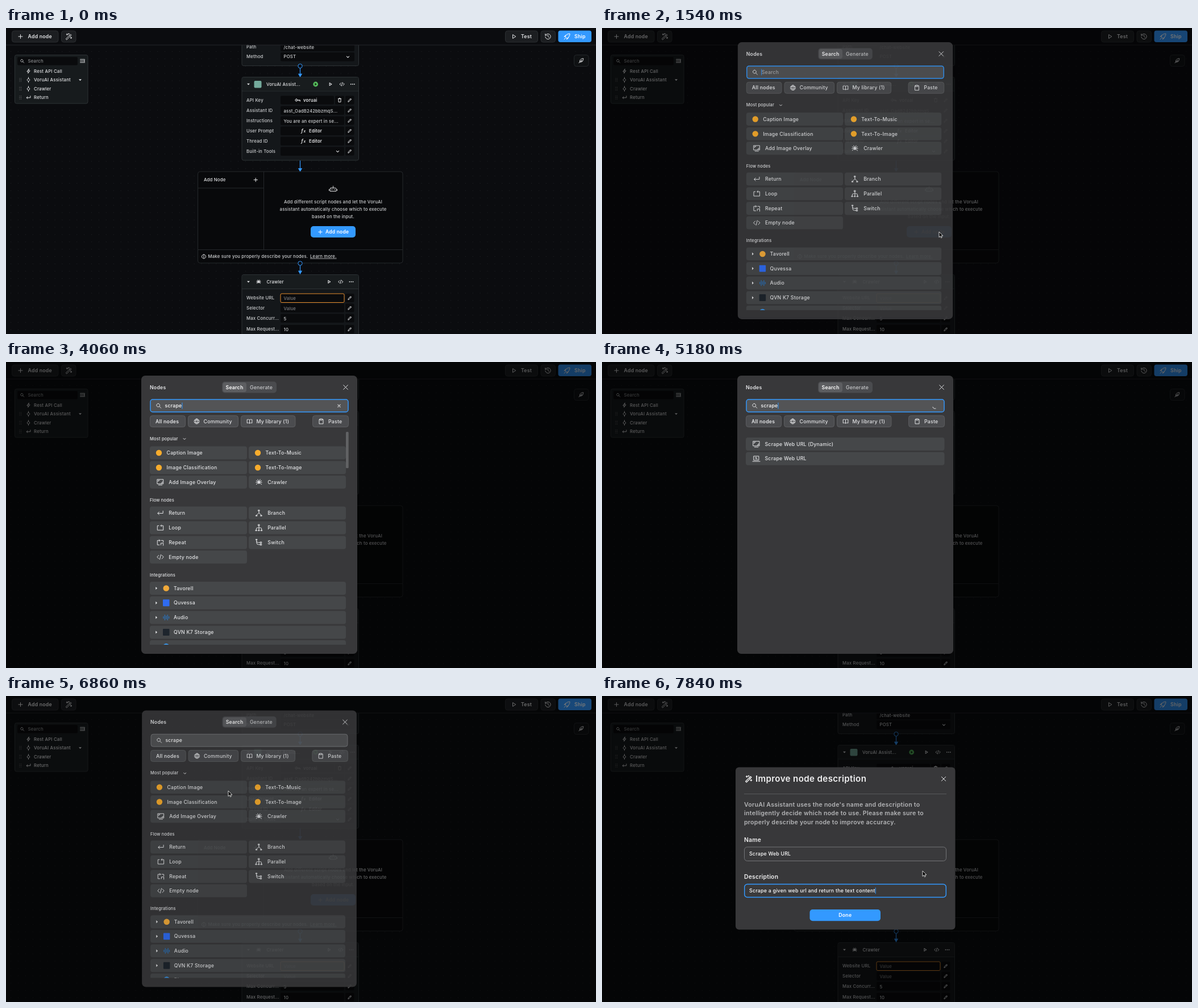
Recreate the animation shown at these times as an HTML page. Size 1038 px wide and 539 px high, loop 8 s.

```html
<!DOCTYPE html>
<html lang="en">
<head>
<meta charset="utf-8">
<title>Node editor</title>
<style>
  html, body { margin: 0; width: 100%; height: 100%; overflow: hidden; background: #0b0c0f; }
  svg { display: block; width: 100%; height: 100%; }
  text { font-family: Inter, sans-serif; letter-spacing: .025em; white-space: pre; }
</style>
</head>
<body>
<svg id="stage" viewBox="0 0 1038 539"></svg>
<script>
const LOOP = 8000, STEP = 70;
const BLUE = '#3399ff', INK = '#e4e5e7', MODAL = '#38383a';
const UI = 8.75, NODE = 7.74, SIDE = 7.8, LEAD = 10.57, TITLE = 15.1;

// Line icons on a 24 x 24 grid
const ICONS = {
  plus: 'M12 3V21M3 12H21',
  x: 'M4 4L20 20M20 4L4 20',
  play: 'M6 3L20 12L6 21Z',
  search: 'M10 3a7 7 0 1 0 .01 0M15 15L22 22',
  wand: 'M2 20L18 4l3 3L5 23ZM14 8l3 3M6 2v5M3.500 4.500h5M12 1v3M10.500 2.500h3M20 14v5M17.500 16.500h5',
  history: 'M3 13a9 9 0 1 0 3-7.700L3 8M3 3v5h5M12 7v5l4 3',
  rocket: 'M9 16L6 12C8 6 13 2 22 2C22 11 18 16 12 18ZM6 12L2 13l5-6 3 0M12 18l-1 4 6-5 0-3M2 22l5-5M16 8h.1',
  menu: 'M2 5h20M2 12h13M2 19h20M22 9l-4 3 4 3',
  bolt: 'M14 2L5 14h6l-1 8 9-12h-6Z',
  node: 'M12 6a6 6 0 1 0 .01 0M12 0v6M12 18v6',
  enter: 'M21 5v8H4M8 8l-5 5 5 5',
  chevron: 'M4 8l8 8 8-8',
  code: 'M7 6l-6 6 6 6M17 6l6 6-6 6M14 4l-4 16',
  pencil: 'M3 21l1-5L17 3l4 4L8 20ZM14 6l4 4',
  trash: 'M4 5h16M9 5V2h6v3M6 5v17h12V5',
  key: 'M7 7a5 5 0 1 0 .01 0M7 12h16v5M18 12v4',
  robot: 'M5 10h14a2 2 0 0 1 2 2v8H3v-8a2 2 0 0 1 2-2M12 10V4h.1M8.500 14v2M15.500 14v2M0 14v4M24 14v4',
  info: 'M12 2a10 10 0 1 0 .01 0M12 11v6M12 6.500v1',
  globe: 'M12 2a10 10 0 1 0 .01 0M3 8h18M3 16h18M12 2c-6 6-6 14 0 20c6-6 6-14 0-20',
  book: 'M12 6C9 4 6 4 2 5v14c4-1 7-1 10 1c3-2 6-2 10-1V5c-4-1-7-1-10 1v14',
  clip: 'M8 4H4v18h16V4h-4M8 2h8v5H8Z',
  screen: 'M2 3h20v15H2ZM6 22h12M15 15h4v-4M5 10V6h4',
  spider: 'M12 8a3 4.500 0 1 0 .01 0M11 9v8M13 9v8M9 11L3 7M9 13H2M9 15l-6 5M15 11l6-4M15 13h7M15 15l6 5M10 8L8 3M14 8l2-5',
  loop: 'M7 5H2v15h20V5h-8M16 2l-3 3 3 3',
  repeat: 'M9 20H2V5h9M8 2l3 3-3 3M15 5h7v6M14 20v-6h8v8',
  branch: 'M12 4v7C12 16 4 14 4 21M12 11C12 16 20 14 20 21M10 2h4v3h-4ZM2 20h4v2H2ZM18 20h4v2h-4Z',
  parallel: 'M12 4v16M3 20v-4q0-4 4-4h10q4 0 4 4v4M10 1h4v4h-4ZM1 20h4v2H1ZM10 20h4v2h-4ZM19 20h4v2h-4Z',
  fork: 'M4 2v10q0 7 7 7h6M4 8q0 4 5 4h7M17 10h4v4h-4ZM17 17h4v4h-4ZM2 1h4v2H2Z',
  laptop: 'M4 4h16v13H4ZM0 21h24M11 7.500a2.500 2.500 0 1 0 .01 0M13 12l2 2',
  quill: 'M2 22L15 9M6 18C4 10 10 3 21 3C21 14 14 20 6 18M10 14h6'
};

const rect = (x, y, x2, y2, fill, r = 0, stroke = 'none', sw = 1, id = '') =>
  `<rect id="${id}" x="${x}" y="${y}" width="${x2 - x}" height="${y2 - y}" rx="${r}" fill="${fill}" stroke="${stroke}" stroke-width="${sw}"/>`;
const dot = (x, y, r, fill, stroke = 'none') =>
  `<circle cx="${x}" cy="${y}" r="${r}" fill="${fill}" stroke="${stroke}"/>`;
const path = (d, stroke, sw = 1, fill = 'none') =>
  `<path d="${d}" fill="${fill}" stroke="${stroke}" stroke-width="${sw}"/>`;
const text = (x, mid, str, size = UI, weight = 500, fill = INK, extra = '') =>
  `<text x="${x}" y="${mid + size * .36}" font-size="${size}" font-weight="${weight}" fill="${fill}" ${extra}>${str}</text>`;
const MIDDLE = 'text-anchor="middle"';
const icon = (name, x, y, size = 10, color = INK, width = 1, fill = 'none') => {
  const k = size / 24;
  return `<path d="${ICONS[name]}" transform="translate(${x - size / 2} ${y - size / 2}) scale(${k})" fill="${fill}"
    stroke="${color}" stroke-width="${width / k}" stroke-linecap="round" stroke-linejoin="round"/>`;
};
const caretDown = (x, y) => path(`M${x - 2.5} ${y - 1.2}h5l-2.5 2.8z`, 'none', 0, INK);
const caretRight = (x, y) => path(`M${x - 1.2} ${y - 2.6}v5.200l2.800-2.600z`, 'none', 0, INK);
const group = (id, body, extra = '') => `<g id="${id}" ${extra}>${body}</g>`;

// Canvas
const FIELD = '#0a0b0d', EDGE = '#2d3235', LABEL = '#cfd1d3';
const label = (y, str) => text(423, y, str, NODE, 500, LABEL);
const pencil = y => rect(597, y - 7.5, 612.5, y + 7.5, FIELD, 2) + icon('pencil', 604.8, y, 7.5);
const field = (y, value, fill = LABEL, stroke) =>
  rect(483, y - 7.5, 595, y + 8, FIELD, 2, stroke) + text(488.5, y + 1, value, NODE, 500, fill) + pencil(y);
const editor = y => field(y, '') + text(519, y, 'ƒ', 9, 600, INK, 'font-style="italic"') +
  text(523.5, y + 1, 'x', 6.5, 600, INK, 'font-style="italic"') + text(533, y, 'Editor', NODE, 600);
const card = (top, bottom, head) =>
  rect(415, top, 620.5, bottom, '#14171a', 3, EDGE) +
  (head ? path(`M415 ${head}H620.500`, EDGE) + rect(415.5, top + .5, 620, head - .5, '#181c1e', 3) : '');
const cardTools = (y, x) => caretDown(426.5, y) + icon('play', x, y, 6.5) + icon('code', x + 20.3, y, 9) +
  [-3, 0, 3].map(d => dot(x + 39 + d, y, .9, INK)).join('');
const arrow = (from, to) => path(`M517.500 ${from}V${to - 4}`, BLUE, 1.2) +
  path(`M513.800 ${to - 6.5}h7.400l-3.700 6.500z`, 'none', 0, BLUE);

const canvas =
  `<pattern id="grid" x="2.200" y="9.100" width="12.900" height="12.900" patternUnits="userSpaceOnUse">${dot(6.4, 6.4, .55, '#25282c')}</pattern>` +
  rect(0, 30, 1038, 539, '#0b0c0f') + rect(0, 30, 1038, 539, 'url(#grid)') +
  card(10, 66.5) + label(33, 'Path') + rect(483, 24, 613, 41, FIELD, 2) + text(488.5, 34, '/chat-website', NODE, 500, LABEL) +
  label(50.5, 'Method') + rect(483, 43, 613, 58.5, FIELD, 2) + text(488.5, 50, 'POST', NODE, 500, LABEL) + icon('chevron', 601.5, 51, 6.5) +
  arrow(67, 87) + dot(517.5, 67, 3.7, '#0b0c0f', BLUE) +
  card(86.5, 233, 111) + cardTools(99, 570.8) + rect(436.5, 93, 449.5, 105.5, '#74aa9c', 2) +
  text(458, 99, 'VoruAI Assist...', NODE, 500) + dot(544.7, 99, 4.4, '#55b95c') + icon('play', 545, 99, 4, '#10200f', .6, '#10200f') +
  label(127, 'API Key') + rect(483, 119.5, 577, 134.5, FIELD, 2) + icon('key', 513, 127, 10) + text(523, 127, 'voruai', NODE, 600) +
  rect(579, 119.5, 595, 134.5, FIELD, 2) + icon('trash', 587, 127, 8) + pencil(127) +
  label(145, 'Assistant ID') + field(145, 'asst_OadB242bbzmqS...') +
  label(163, 'Instructions') + field(163, 'You are an expert in se...') +
  label(181, 'User Prompt') + editor(181) + label(199, 'Thread ID') + editor(199) +
  label(217, 'Built-in Tools') + field(217, '') + icon('chevron', 583.5, 217.5, 6.5) +
  arrow(233.5, 253.5) +
  rect(337.5, 253, 698, 414, '#08090b', 4, '#25282b') + path('M453.500 253V390M337.500 282H453.500M337.500 390.500H698', '#25282b') +
  text(348, 267.5, 'Add Node', NODE, 500) + icon('plus', 439.3, 267.5, 8.5) + icon('robot', 575.5, 283, 14) +
  ['Add different script nodes and let the VoruAI', 'assistant automatically choose which to execute', 'based on the input.']
    .map((s, i) => text(575.5, 306 + i * 12.9, s, NODE, 500, LABEL, MIDDLE)).join('') +
  `<linearGradient id="hover"><stop offset=".44" stop-color="#2f88dc"/><stop offset=".48" stop-color="#5a9fe8"/></linearGradient>` +
  rect(536, 349, 615, 369, BLUE, 5, 'none', 0, 'addButton') +
  icon('plus', 553, 359.3, 8.5, '#fff') + text(562, 359, 'Add node', 8.5, 600, '#fff') +
  icon('info', 348, 402.5, 8.5) + text(355.5, 402, 'Make sure you properly describe your nodes.', NODE, 500, LABEL) +
  text(535, 402, 'Learn more.', NODE, 500, LABEL, 'text-decoration="underline"') +
  arrow(416, 434) + group('port', dot(517.5, 414.5, 3.7, '#0b0c0f', BLUE)) +
  group('portHover', dot(517.8, 414.5, 5.8, '#0d1b2a', BLUE) + icon('plus', 517.8, 414.5, 5.5, BLUE, .9)) +
  card(434.5, 560, 459.5) + cardTools(447, 568.5) + icon('spider', 444.5, 447, 8.5) + text(458.5, 447, 'Crawler', NODE) +
  label(475, 'Website URL') + field(475.5, 'Value', '#7c7e80', '#e58c2c') + label(493, 'Selector') + field(493, 'Value', '#7c7e80') +
  label(511.5, 'Max Concurr...') + field(511, '5') + label(530.5, 'Max Request...') + field(530.5, '10');

const BTN = '#1c1e21', BTN_EDGE = '#2a2d30';
const grip = y => [-2.6, 0, 2.6].map(d => dot(24, y + d, .6, '#777') + dot(26.6, y + d, .6, '#777')).join('');
const sideRow = (y, glyph, name) => icon(glyph, 39.5, y, 9) + text(49, y, name, SIDE, 500) + (y > 80 ? grip(y) : '');
const chrome =
  rect(0, 0, 1038, 30, '#0b0c0f') + path('M0 30H1038', '#24272a') +
  rect(10.5, 5, 92, 25, BTN, 4, BTN_EDGE) + icon('plus', 25.5, 15, 9.5) + text(38.5, 15, 'Add node', UI, 600) +
  rect(97.5, 5, 123, 25, BTN, 4, BTN_EDGE) + icon('wand', 110.5, 15, 12) +
  rect(878.5, 5, 935.5, 25, BTN, 4, BTN_EDGE) + icon('play', 894, 15, 8.5) + text(906, 15, 'Test', UI, 600) +
  rect(941, 5, 966.5, 25, BTN, 4, BTN_EDGE) + icon('history', 953.5, 15, 12.5) +
  rect(971.5, 4.5, 1030, 25, BLUE, 4) + icon('rocket', 987, 15, 12, '#fff') + text(1000, 15, 'Ship', UI, 600, '#fff') +
  rect(15.5, 47.5, 144, 133, '#171b1d', 3, EDGE) + rect(20, 51, 126, 65.5, FIELD, 2) +
  icon('search', 28.5, 58.2, 7.5, '#b9bbbd') + text(38.5, 58.3, 'Search', SIDE, 500, '#8b8d8f') + icon('menu', 134.5, 58, 9.5) +
  sideRow(76, 'bolt', 'Rest API Call') + sideRow(91.4, 'node', 'VoruAI Assistant') + caretDown(130.5, 91.5) +
  sideRow(107, 'node', 'Crawler') + sideRow(122.4, 'enter', 'Return') +
  rect(999.5, 47.5, 1025, 67.5, '#0f1113', 4, '#24272a') + icon('quill', 1012, 57.5, 10);

// Node picker
const ROW = '#454749', PILL = '#4b4c4f', PILL_EDGE = '#626466';
const pill = (x, x2, glyph, str, tx, weight = 500) => rect(x + .5, 94.5, x2 - .5, 114.5, PILL, 4, PILL_EDGE, .8) +
  (glyph ? icon(glyph, x + 15.5, 104.5, 10.5) : '') + text(tx, 104.5, str, UI, weight);
const row = (x, x2, y, mark, str, tx) => rect(x, y - 11.5, x2, y + 11.5, ROW, 4) + mark + text(tx, y, str);
const cell = (col, y, glyph, str) => {
  const x = col ? 427 : 253, round = glyph === 'round', ix = x + (round ? 16 : col ? 18 : 18.5);
  return row(x, x + 171, y, round ? dot(ix, y, 5.2, '#f7ac2d') : icon(glyph, ix, y, 12.5), str, x + (round ? 29.5 : 33.3));
};
const square = (y, fill) => rect(276, y - 6, 287.5, y + 6, fill, 1);
const provider = (y, mark, str) => row(253, 598, y, caretRight(264.5, y) + mark, str, 295);
const bars = y => path([2, 5, 3, 5, 2].map((h, i) => `M${277 + i * 2.4} ${y - h}v${2 * h}`).join(''), '#2c6fb3', 1.3);

const list =
  text(253, 135, 'Most popular', 7.5) + icon('chevron', 314, 135.5, 6) +
  cell(0, 160, 'round', 'Caption Image') + cell(1, 160, 'round', 'Text-To-Music') +
  cell(0, 186, 'round', 'Image Classification') + cell(1, 186, 'round', 'Text-To-Image') +
  cell(0, 211.5, 'screen', 'Add Image Overlay') + cell(1, 211.5, 'spider', 'Crawler') +
  text(253, 243, 'Flow nodes', 7.5) +
  cell(0, 266, 'enter', 'Return') + cell(1, 266, 'branch', 'Branch') +
  cell(0, 292, 'loop', 'Loop') + cell(1, 292, 'parallel', 'Parallel') +
  cell(0, 318, 'repeat', 'Repeat') + cell(1, 318, 'fork', 'Switch') + cell(0, 343.5, 'code', 'Empty node') +
  text(253, 375, 'Integrations', 7.5) +
  provider(398.5, dot(281.8, 398.5, 5.3, '#f0a93a'), 'Tavorell') + provider(424.3, square(424.3, '#2f6bf0'), 'Quvessa') +
  provider(450, bars(450), 'Audio') + provider(476, square(476, '#1e252d'), 'QVN K7 Storage') +
  provider(501.5, dot(281.8, 501, 5.3, '#3a96e8'), 'Blorn');

const results =
  row(253, 602.5, 144.5, icon('screen', 271.5, 144.5, 13), 'Scrape Web URL (Dynamic)', 286.5) +
  row(253, 602.5, 170.2, group('rowHover', rect(253, 158.7, 602.5, 181.7, '#525355', 4) + icon('info', 586, 170.2, 11)) +
    icon('laptop', 271.5, 170.2, 13), 'Scrape Web URL', 286.5);

const picker =
  rect(238, 24, 618, 514, MODAL, 7) + text(253, 44.5, 'Nodes', UI, 600) +
  rect(380, 34.5, 476, 54.5, '#4a4b4e', 5) + rect(381.5, 36, 423, 53, '#5d5e61', 4) +
  text(402, 44.5, 'Search', UI, 600, '#fff', MIDDLE) + text(449, 44.5, 'Generate', UI, 500, '#c9cacc', MIDDLE) + icon('x', 597.5, 44.5, 11.5) +
  rect(254, 66, 602, 88, '#535456', 4, BLUE, 1.45, 'searchBox') +
  icon('search', 268.5, 77, 10) + text(280, 77, 'Search', UI, 500, '#a9aaac', 'id="hint"') + text(279.5, 77, '', UI, 500, '#fff', 'id="query"') +
  rect(0, 71.5, 1, 82.5, BLUE, 0, 'none', 0, 'caret') +
  group('clear', icon('x', 586, 77.3, 6.5)) + group('spinner', path('M0 4.500A4.500 4.500 0 0 1 -4.500 0', '#d5d6d8', 1)) +
  pill(253, 316, '', 'All nodes', 263, 600) + pill(320, 409, 'globe', 'Community', 347.5) +
  pill(413, 509.5, 'book', 'My library (1)', 440.5) + pill(539, 603, 'clip', 'Paste', 567) +
  `<clipPath id="view"><rect x="238" y="120" width="380" height="378"/></clipPath>` +
  group('list', list, 'clip-path="url(#view)"') + group('results', results) + group('scrollbar', rect(598, 123, 602.7, 187, '#616264', 1.5));

// Description dialog
const heading = (y, str) => text(250, y, str, 10.3, 600, '#f0f0f1');
const dialog =
  rect(235, 125.5, 621.5, 411.5, MODAL, 6) + icon('wand', 258, 146, 13, '#fff', 1.2) +
  text(270, 146, 'Improve node description', TITLE, 600, '#f0f0f1') + icon('x', 601, 146, 11) + path('M250 172.500H606', '#58595b') +
  ["VoruAI Assistant uses the node's name and description to", 'intelligently decide which node to use. Please make sure to', 'properly describe your node to improve accuracy.']
    .map((s, i) => text(250, 191 + i * 15.6, s, LEAD, 600, '#b4b5b7')).join('') +
  heading(253, 'Name') + rect(250.5, 266, 605.5, 290.5, '#3a3a3c', 5, '#737477') + text(259, 278.3, 'Scrape Web URL', UI, 500, '#fff') +
  heading(318.5, 'Description') + rect(250.7, 331.5, 605.3, 354.5, '#3a3a3c', 5, BLUE, 1.45) +
  text(259, 343, 'Scrape a given web url and return the text content', 8.82, 500, '#fff', 'id="about"') +
  rect(0, 337.5, 1, 348.5, BLUE, 0, 'none', 0, 'aboutCaret') +
  rect(365.5, 376, 490, 396.3, BLUE, 5) + text(427.8, 386, 'Done', UI, 600, '#fff', MIDDLE);

const pointer =
  group('arrow', path('M0 0V9.600L2.200 7.600L3.600 10.700L5.200 10L3.800 7H6.900Z', '#fff', .8, '#000')) +
  group('hand', path('M-1 1Q0-.5 1 1V4.500Q4 4 4.500 6Q5 9 3 11H-1.500Q-3 8-4.300 6.300Q-3.500 5-1 6.800Z', '#000', .7, '#fff'));

document.getElementById('stage').innerHTML =
  group('canvas', canvas) + chrome + group('shade', rect(0, 0, 1038, 539, '#000')) +
  group('picker', picker) + group('dialog', dialog) + group('pointer', pointer);

const el = id => document.getElementById(id);
const show = (id, on) => { el(id).style.display = on ? '' : 'none'; };
const clamp = x => Math.min(1, Math.max(0, x));

const KEYS = [[3150, 's'], [3360, 'c'], [3570, 'r'], [3710, 'a'], [3850, 'p'], [4060, 'e']];
// time, x, y of the pointer tip
const TRAIL = [[70, 437, 392], [350, 520, 411], [490, 520, 411], [1120, 593, 359], [5320, 593, 359], [6020, 424, 177],
  [6650, 424, 177], [6860, 391, 167], [7000, 391, 167], [7420, 598, 237], [7840, 564, 308]];

function trailAt(t) {
  const i = TRAIL.findIndex(p => p[0] > t);
  if (i < 1) return (i ? TRAIL[TRAIL.length - 1] : TRAIL[0]).slice(1);
  const [a, b] = [TRAIL[i - 1], TRAIL[i]], u = (t - a[0]) / (b[0] - a[0]), k = u * u * (3 - 2 * u);
  return [1, 2].map(n => a[n] + (b[n] - a[n]) * k);
}
const enter = (t, from) => 1 - (1 - clamp((t - from) / 300)) ** 2;
const leave = (t, from) => 1 - clamp((t - from) / 200) ** 2;

function pop(id, amount) {
  const s = .95 + .05 * amount;
  el(id).setAttribute('opacity', amount);
  el(id).setAttribute('transform', `translate(428 269) scale(${s}) translate(-428 -269)`);
}

function draw(t) {
  const pick = enter(t, 1330) * leave(t, 6790), ask = enter(t, 7070);
  pop('picker', pick);
  pop('dialog', ask);
  el('shade').setAttribute('opacity', .6 * Math.max(pick, ask));

  const typed = KEYS.filter(k => t >= k[0]).map(k => k[1]).join('');
  const searching = t >= 4480 && t < 6650, focused = t < 6650;
  el('query').textContent = typed;
  show('hint', !typed);
  show('caret', focused && !(t >= 2240 && t < 2800));
  el('caret').setAttribute('x', 279.5 + (typed ? el('query').getComputedTextLength() : 0));
  show('clear', t >= 3150 && !searching && focused);
  show('spinner', searching);
  el('spinner').setAttribute('transform', `translate(586 77.500) rotate(${(Math.min(t, 6370) - 6230) * .36})`);
  el('searchBox').setAttribute('stroke', focused ? BLUE : '#77787b');
  el('searchBox').setAttribute('stroke-width', focused ? 1.45 : 1);
  show('list', !searching);
  show('results', searching);
  show('scrollbar', t >= 1610 && t < 4480);

  const [x, y] = trailAt(t);
  const overRow = searching && y < 181;
  show('rowHover', overRow);
  show('pointer', t >= 70 && !(t >= 3150 && t < 5320));
  show('hand', overRow);
  show('arrow', !overRow);
  el('pointer').setAttribute('transform', `translate(${x} ${y})`);

  const nearPort = t >= 210 && t < 1330;
  show('port', !nearPort);
  show('portHover', nearPort);
  el('addButton').setAttribute('fill', t >= 980 && t < 1330 ? 'url(#hover)' : BLUE);
  el('aboutCaret').setAttribute('x', 259 + el('about').getComputedTextLength());
}

function tick() {
  const t = performance.now() % LOOP;
  draw(Math.floor(t / STEP) * STEP);
  requestAnimationFrame(tick);
}
tick();
</script>
</body>
</html>
```
